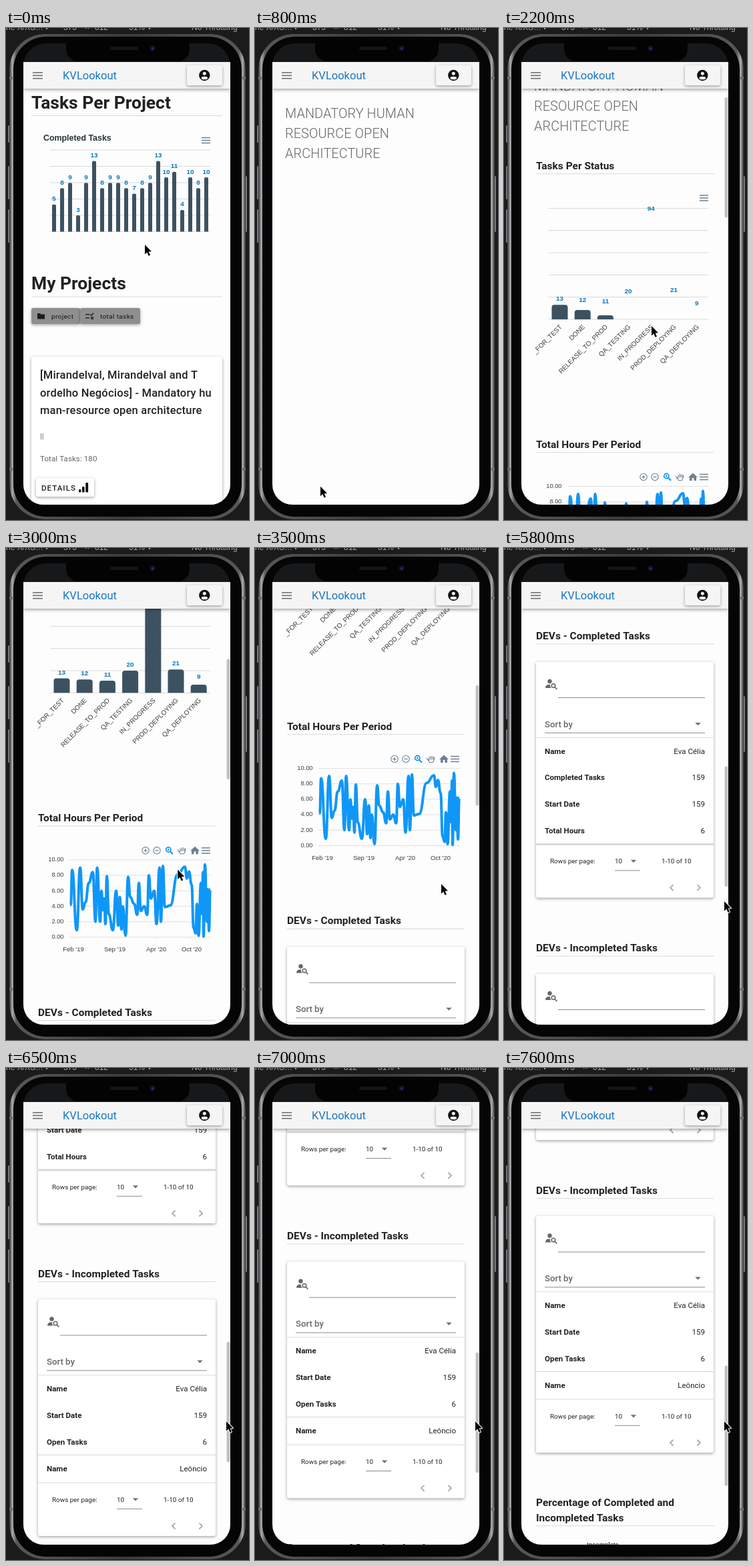
An HTML page with a canvas that plays this animation: 364 px wide and 738 px high, repeating every 8 s.

```html
<!DOCTYPE html>
<html lang="en">
<head>
<meta charset="utf-8">
<title>Task dashboard on a phone</title>
<style>
html, body { margin: 0; width: 100%; height: 100%; overflow: hidden; background: #1b1b1c; }
canvas { display: block; width: 364px; height: 738px; }
</style>
</head>
<body>
<canvas id="stage"></canvas>
<script>
const W = 364, H = 738, LOOP = 8000;
const SWAP = 700, LOADED = 1000;
const canvas = document.getElementById('stage');
const dpr = window.devicePixelRatio || 1;
canvas.width = W * dpr;
canvas.height = H * dpr;
const c = canvas.getContext('2d');

const ROBOTO = 'Roboto, sans-serif';
const SANS = '"Liberation Sans", Arial, sans-serif';
const INK = 'rgba(0,0,0,.87)', SOFT = 'rgba(0,0,0,.6)', RULE = '#d9d9d9';
const BAR = '#3c5261', BLUE = '#0077c2', TOOL = '#6e8192', LINE = '#0f97f7';

// ---- drawing helpers ----
// y is the middle of the capitals
function text(s, x, y, size, o = {}) {
  c.font = `${o.w || 400} ${size}px ${o.f || ROBOTO}`;
  c.fillStyle = o.c || INK;
  c.textAlign = o.a || 'left';
  c.letterSpacing = (o.ls || 0) + 'px';
  c.fillText(s, x, y + size * 0.36);
}
function box(x, y, w, h, fill) {
  c.fillStyle = fill;
  c.fillRect(x, y, w, h);
}
function round(x, y, w, h, r, fill) {
  c.beginPath();
  c.roundRect(x, y, w, h, r);
  c.fillStyle = fill;
  c.fill();
}
function raised(x, y, w, h, r, fill, blur = 4, dy = 1.5) {
  c.save();
  c.shadowColor = 'rgba(0,0,0,.36)';
  c.shadowBlur = blur * dpr;
  c.shadowOffsetY = dy * dpr;
  round(x, y, w, h, r, fill);
  c.restore();
}
function rule(x1, x2, y, color = RULE) {
  box(x1, y - 0.5, x2 - x1, 1, color);
}
function poly(points, fill) {
  c.beginPath();
  points.forEach(([x, y]) => c.lineTo(x, y));
  c.closePath();
  c.fillStyle = fill;
  c.fill();
}
function stroke(points, color, width) {
  c.beginPath();
  points.forEach(([x, y], i) => i ? c.lineTo(x, y) : c.moveTo(x, y));
  c.strokeStyle = color;
  c.lineWidth = width;
  c.stroke();
}
function ring(x, y, r, color, width) {
  c.beginPath();
  c.arc(x, y, r, 0, 7);
  c.strokeStyle = color;
  c.lineWidth = width;
  c.stroke();
}
function disc(x, y, r, color) {
  c.beginPath();
  c.arc(x, y, r, 0, 7);
  c.fillStyle = color;
  c.fill();
}
function menu(x, y, w, gap, color, thick = 1.5) {
  for (const k of [-1, 0, 1]) box(x, y + k * gap - thick / 2, w, thick, color);
}
function caret(x, y) {
  poly([[x - 4.2, y - 2], [x + 4.2, y - 2], [x, y + 2.3]], '#707070');
}

// ---- motion ----
const SCROLL = [[1800, -41], [2200, 0], [3500, 357], [4500, 492], [5200, 492],
  [5800, 784.5], [6500, 1076], [7600, 1201]];
const POINTER = [[100, 208, 325], [500, 98, 686], [900, 98, 688], [1100, 122, 704], [1900, 221, 447],
  [2300, 221, 447], [3500, 279, 504], [4200, 348, 526], [4600, 334, 526], [4800, 346, 529], [5000, 330, 530]];

function track(keys, t, k, ease) {
  if (t <= keys[0][0]) return keys[0][k];
  for (let i = 1; i < keys.length; i++) {
    const a = keys[i - 1], b = keys[i];
    if (t <= b[0]) {
      let u = (t - a[0]) / (b[0] - a[0]);
      if (ease) u = u * u * (3 - 2 * u);
      return a[k] + (b[k] - a[k]) * u;
    }
  }
  return keys[keys.length - 1][k];
}

// ---- home page ----
const DONE = [5, 8, 9, 3, 9, 13, 8, 9, 9, 8, 7, 8, 9, 13, 10, 11, 4, 10, 8, 10];

function home() {
  text('Tasks Per Project', 38, 111, 26.45, { w: 700 });
  rule(38, 324, 131.5);
  text('Completed Tasks', 56, 165, 12.4, { w: 700, f: SANS, c: '#263238' });
  menu(293, 168.5, 13, 4, TOOL);
  for (let i = 0; i < 6; i++) rule(66, 306, 183 + i * 24.5);
  DONE.forEach((v, i) => {
    const x = 72 + i * 12, h = v * 8.15;
    round(x - 3, 305.5 - h, 6, h, [2, 2, 0, 0], BAR);
    text(v, x, 296.5 - h, 9.92, { w: 700, f: SANS, c: BLUE, a: 'center' });
  });

  text('My Projects', 38, 382.5, 26.45, { w: 700 });
  rule(38, 324, 403);
  raised(38, 420, 73, 24, 3, '#8f8f8f');
  raised(111, 420, 90, 24, 3, '#8f8f8f');
  poly([[47, 428], [51, 428], [52.5, 429.5], [58, 429.5], [58, 436.5], [47, 436.5]], '#1c1c1c');
  text('project', 68, 432, 9.92, { ls: 0.4 });
  box(119, 429, 6, 1.4, '#1c1c1c');
  box(119, 434, 6, 1.4, '#1c1c1c');
  stroke([[126, 429.5], [128, 431], [131, 427.5]], '#1c1c1c', 1.3);
  stroke([[127, 433], [131, 437]], '#1c1c1c', 1.3);
  stroke([[131, 433], [127, 437]], '#1c1c1c', 1.3);
  text('total tasks', 141, 432, 9.92, { ls: 0.4 });

  raised(38, 493, 286, 260, 3, '#fff');
  ['[Mirandelval, Mirandelval and T', 'ordelho Negócios] - Mandatory hu', 'man-resource open architecture']
    .forEach((s, i) => text(s, 51, 520.5 + i * 26.5, 16.53, { w: 500, ls: 0.2 }));
  text('||', 51, 612, 11.57, { c: SOFT });
  text('Total Tasks: 180', 51, 645.5, 11.57, { c: SOFT, ls: 0.08 });
  raised(45, 675, 87, 28, 3, '#fff');
  text('DETAILS', 53, 690, 11.57, { w: 500, ls: 1.03 });
  round(109, 692, 3.4, 4.5, 1, '#111');
  round(114, 688, 3.6, 8.5, 1, '#111');
  round(119.3, 682, 3.8, 14.5, 1, '#111');
}

// ---- project page ----
const STATUS = [['READY_FOR_TEST', 13], ['DONE', 12], ['RELEASE_TO_PROD', 11], ['QA_TESTING', 20],
  ['IN_PROGRESS', 94], ['PROD_DEPLOYING', 21], ['QA_DEPLOYING', 9]];

function section(title, y) {
  text(title, 48, y, 15.48, { w: 700 });
  rule(48, 314, y + 12.7);
}

function statusChart(t) {
  menu(293, 255, 13, 4, TOOL);
  for (let i = 0; i < 6; i++) rule(67, 306, 270.5 + i * 33.3);
  c.save();
  c.beginPath();
  c.rect(46, 230, 275, 330);
  c.clip();
  STATUS.forEach(([name, v], i) => {
    const x = 83.5 + i * 34.2, full = v * 1.67;
    const grow = Math.min(1, Math.max(0, (t - 1767 - i * 150) / 405));
    if (grow > 0) {
      const h = full * grow, r = Math.min(4, h);
      round(x - 12, 437 - h, 24, h, [r, r, 0, 0], BAR);
    }
    text(v, x, 427.5 - full, 9.92, { w: 700, f: SANS, c: BLUE, a: 'center' });
    c.save();
    c.translate(x + 1.5, 446.5);
    c.rotate(-Math.PI / 4);
    text(name, 0, 0, 9.92, { f: SANS, c: '#373d3f', a: 'right' });
    c.restore();
  });
  c.restore();
}

const HOURS = [[96, 4.3], [97, 4.2], [99, 8.7], [106, 0.9], [111, 9], [115, 3.6], [119, 4.5], [124, 7],
  [130, 8.4], [134, 2], [136.5, 9], [141, 2], [143, 6], [145, 3.5], [147, 5], [149, 1.7], [151, 7.9],
  [154, 3], [160, 0.9], [165, 6], [168, 1.5], [170.5, 5.2], [173, 1], [175, 4], [179, 0.2], [183, 7.8],
  [186, 5.2], [192, 4.3], [196.5, 2.9], [199, 7], [202, 3.4], [207, 4], [211.5, 2.9], [214, 8],
  [217, 5], [222, 6], [225.5, 1.7], [230, 9], [232, 2], [235, 9.2], [238, 3.9], [246, 4.1], [257, 8.1],
  [268, 9.1], [271, 7.6], [274, 8.5], [278, 6.8], [281, 1.2], [284, 0.5], [286, 4.3], [288.5, 0.2],
  [292, 7], [294, 3], [295, 8.4], [296, 0.1], [298, 9.4], [301, 2], [302.5, 6.2], [304, 0.8], [306, 6.2]];

function chartTools(y) {
  for (const x of [209, 226]) {
    ring(x, y, 5.2, TOOL, 1.1);
    box(x - 2.6, y - 0.6, 5.2, 1.2, TOOL);
  }
  box(208.4, y - 2.6, 1.2, 5.2, TOOL);
  ring(243.3, y - 1.5, 3.6, '#008ffb', 1.6);
  stroke([[246, y + 1.2], [250, y + 5.2]], '#008ffb', 2);
  box(241.6, y - 2, 3.4, 1, '#008ffb');
  box(242.8, y - 3.2, 1, 3.4, '#008ffb');
  for (let i = 0; i < 4; i++) stroke([[261 + i * 2.2, y + 1], [261 + i * 2.2, y - 4.6 + (i % 3 ? 0 : 1.2)]], TOOL, 1.1);
  stroke([[261, y + 2], [258, y - 0.2], [261.5, y + 5], [266.5, y + 5], [268.4, y + 1], [268.4, y - 3]], TOOL, 1.1);
  poly([[276, y + 0.5], [283, y - 6], [290, y + 0.5], [288, y + 0.5], [288, y + 5.5], [284.4, y + 5.5],
    [284.4, y + 1.5], [281.6, y + 1.5], [281.6, y + 5.5], [278, y + 5.5], [278, y + 0.5]], TOOL);
  menu(293, y, 13, 4, TOOL);
}

function hoursChart() {
  chartTools(673.5);
  for (let v = 0; v <= 10; v += 2) {
    const y = 803.5 - v * 11.6;
    rule(95, 307, y, '#e0e0e0');
    text(v.toFixed(2), 86.5, y - 1, 9.3, { f: SANS, c: '#373d3f', a: 'right' });
  }
  [["Feb '19", 101], ["Sep '19", 163], ["Apr '20", 225], ["Oct '20", 278]]
    .forEach(([s, x]) => {
      rule(x - 0.5, x + 0.5, 805.5, '#ccc');
      text(s, x, 821.5, 9.6, { f: SANS, c: '#373d3f', a: 'center' });
    });
  c.beginPath();
  let px, py;
  HOURS.forEach(([x, v], i) => {
    const y = 803.5 - v * 11.6, m = (px + x) / 2;
    if (i) c.bezierCurveTo(m, py, m, y, x, y);
    else c.moveTo(x, y);
    px = x;
    py = y;
  });
  c.strokeStyle = LINE;
  c.lineWidth = 4;
  c.lineJoin = 'round';
  c.stroke();
}

function personSearch(x, y) {
  const g = '#666';
  disc(x - 2.5, y - 4, 3.2, g);
  c.beginPath();
  c.moveTo(x - 9, y + 6);
  c.quadraticCurveTo(x - 9, y + 0.6, x - 2, y + 0.8);
  c.quadraticCurveTo(x - 2.6, y + 4, x, y + 6);
  c.closePath();
  c.fillStyle = g;
  c.fill();
  ring(x + 3, y + 2.6, 2.8, g, 1.5);
  stroke([[x + 5, y + 4.6], [x + 8.4, y + 8]], g, 1.7);
}

function chevron(x, y, dir) {
  stroke([[x - 2.5 * dir, y - 4.5], [x + 2 * dir, y], [x - 2.5 * dir, y + 4.5]], '#aaa', 1.5);
}

function table(top, foot, rows) {
  raised(48, top, 266, foot + 55 - top, 3, '#fff');
  personSearch(71, top + 33.5);
  rule(81, 301, top + 54, '#8c8c8c');
  text('Sort by', 61, top + 93.5, 13.2, { w: 500, c: SOFT });
  caret(290.5, top + 93.5);
  rule(61, 301, top + 106.8, '#8c8c8c');
  rule(48, 314, top + 113.8, '#dcdcdc');
  rows.forEach(([name, value], i) => {
    const y = top + 134 + i * 39.8;
    if (i && name === 'Name') rule(48, 314, y - 20, '#d4d4d4');
    text(name, 61, y, 11.57, { w: 700 });
    text(value, 301, y, 11.57, { a: 'right' });
  });
  text('Rows per page:', 69, foot + 25.3, 9.92);
  text('10', 166, foot + 25.3, 9.92);
  caret(194, foot + 25.3);
  rule(166, 204, foot + 39.3, '#8c8c8c');
  text('1-10 of 10', 236, foot + 25.3, 9.92);
  chevron(251, foot + 65, -1);
  chevron(292, foot + 65, 1);
}

function pagedTable(top, foot, rows) {
  const border = foot - top > 274.5 ? 1 : 3;
  table(top, foot, rows);
  box(48, foot - border / 2, 266, border, '#dadada');
}

const WHO = 'Eva Célia', OTHER = 'Leôncio';

function project(t) {
  ['MANDATORY HUMAN', 'RESOURCE OPEN', 'ARCHITECTURE']
    .forEach((s, i) => text(s, 45, 87 + i * 29.8, 19.84, { w: 300, c: 'rgba(0,0,0,.6)', ls: 0.1 }));
  if (t < LOADED) return;
  section('Tasks Per Status', 206);
  statusChart(t);
  section('Total Hours Per Period', 624);
  hoursChart();
  section('DEVs - Completed Tasks', 915.7);
  tallTable();
  section('DEVs - Incompleted Tasks', 1384);
  wideTable();
  text('Percentage of Completed and', 48, 1852, 15.48, { w: 700 });
  section('Incompleted Tasks', 1875);
  text('Incomplete', 148, 1915.5, 9, { w: 700, f: SANS, c: '#373d3f', a: 'center' });
}
function tallTable() {
  cardTable(955, 1229, [['Name', WHO], ['Completed Tasks', '159'], ['Start Date', '159'], ['Total Hours', '6']]);
}
function wideTable() {
  cardTable(1423, 1698, [['Name', WHO], ['Start Date', '159'], ['Open Tasks', '6'], ['Name', OTHER]]);
}
function cardTable(top, foot, rows) {
  // the card reaches below the page arrows
  raised(48, top, 266, foot + 80 - top, 3, '#fff');
  c.save();
  c.beginPath();
  c.rect(48, top, 266, foot + 79 - top);
  c.clip();
  pagedTable(top, foot, rows);
  box(48, foot + 53, 266, 8, '#fff');
  chevron(251, foot + 65, -1);
  chevron(292, foot + 65, 1);
  c.restore();
}

// ---- phone and chrome ----
function appBar() {
  c.save();
  c.shadowColor = 'rgba(0,0,0,.4)';
  c.shadowBlur = 5 * dpr;
  c.shadowOffsetY = 1.5 * dpr;
  box(26, 51, 310, 40, '#f5f5f5');
  c.restore();
  menu(40, 71.3, 15, 4.4, '#707070', 1.6);
  text('KVLookout', 85, 71.5, 16.53, { c: '#1976c5' });
  raised(271, 56, 53, 30, 3, '#f5f5f5');
  disc(297.3, 71, 8.2, '#111');
  disc(297.3, 68.2, 2.5, '#f5f5f5');
  c.beginPath();
  c.ellipse(297.3, 75, 4.8, 2.3, 0, 0, 7);
  c.fill();
}

function phone() {
  box(0, 0, W, H, '#1b1b1c');
  const grey = { c: '#a5a8ac', f: SANS };
  [['ne X/XS…', 0], ['▾', 58], ['375', 86], ['×', 118], ['812', 133], ['51%', 184], ['▾', 212], ['No Throttling', 278]]
    .forEach(([s, x]) => text(s, x, -1.5, 12, grey));
  for (const [x, y, h] of [[3, 146, 26], [3, 207, 50], [3, 272, 50], [357, 222, 84]])
    round(x, y, 4, h, 1.5, '#77797c');
  const metal = c.createLinearGradient(5, 0, 359, 0);
  [[0, '#2c2d2f'], [0.012, '#a9abae'], [0.03, '#55575a'], [0.5, '#3a3b3d'], [0.97, '#55575a'], [0.988, '#a9abae'], [1, '#2c2d2f']]
    .forEach(([p, col]) => metal.addColorStop(p, col));
  round(5, 9, 354, 728, 54, metal);
  round(11, 13, 342, 720, 49, '#050506');
  for (const y of [73, 660]) {
    box(5, y, 5, 4, '#6d6f72');
    box(354, y, 5, 4, '#6d6f72');
  }
  round(26, 23, 310, 60, [34, 34, 0, 0], '#17181a');
  round(90, 18, 185, 32, [0, 0, 18, 18], '#030304');
  round(156, 28, 42, 5, 2.5, '#151518');
  disc(219.5, 30.5, 4.5, '#0c1024');
  disc(219.5, 30.5, 1.8, '#26345f');
}

function pointer(x, y, t) {
  c.save();
  c.translate(x, y);
  c.lineJoin = 'round';
  c.beginPath();
  const resize = t >= 4200 && t < 5000;
  const shape = resize
    ? [[-4, 0.5], [-0.5, -3], [-0.5, -5], [0.7, -5], [0.7, -3], [4, 0.5], [0.7, 4], [0.7, 6], [-0.5, 6], [-0.5, 4]]
    : [[0, 0], [0, 14.5], [3.3, 11.4], [5.6, 16.8], [8, 15.8], [5.7, 10.6], [10, 10.3]];
  shape.forEach(([a, b]) => c.lineTo(a, b));
  c.closePath();
  c.strokeStyle = '#fff';
  c.lineWidth = 2;
  c.stroke();
  c.fillStyle = '#000';
  c.fill();
  c.restore();
}

function draw(t) {
  const scroll = track(SCROLL, t, 1);
  c.setTransform(dpr, 0, 0, dpr, 0, 0);
  phone();
  c.save();
  c.beginPath();
  c.roundRect(26, 51, 310, 664, [0, 0, 30, 30]);
  c.clip();
  box(26, 51, 310, 664, '#fdfdfd');
  if (t < SWAP) {
    home();
  } else {
    c.save();
    c.translate(0, -scroll);
    project(t);
    c.restore();
    if (t >= 1900) round(330.5, 104 + scroll * 0.285, 5, 180.5, 2.5, '#c1c1c1');
  }
  appBar();
  c.restore();
  pointer(track(POINTER, t, 1, true), track(POINTER, t, 2, true), t);
}

const start = performance.now();
function tick(now) {
  const t = Math.max(0, now - start) % LOOP;
  draw(Math.floor(t / 100) * 100);
  requestAnimationFrame(tick);
}
draw(0);
requestAnimationFrame(tick);
</script>
</body>
</html>
```
